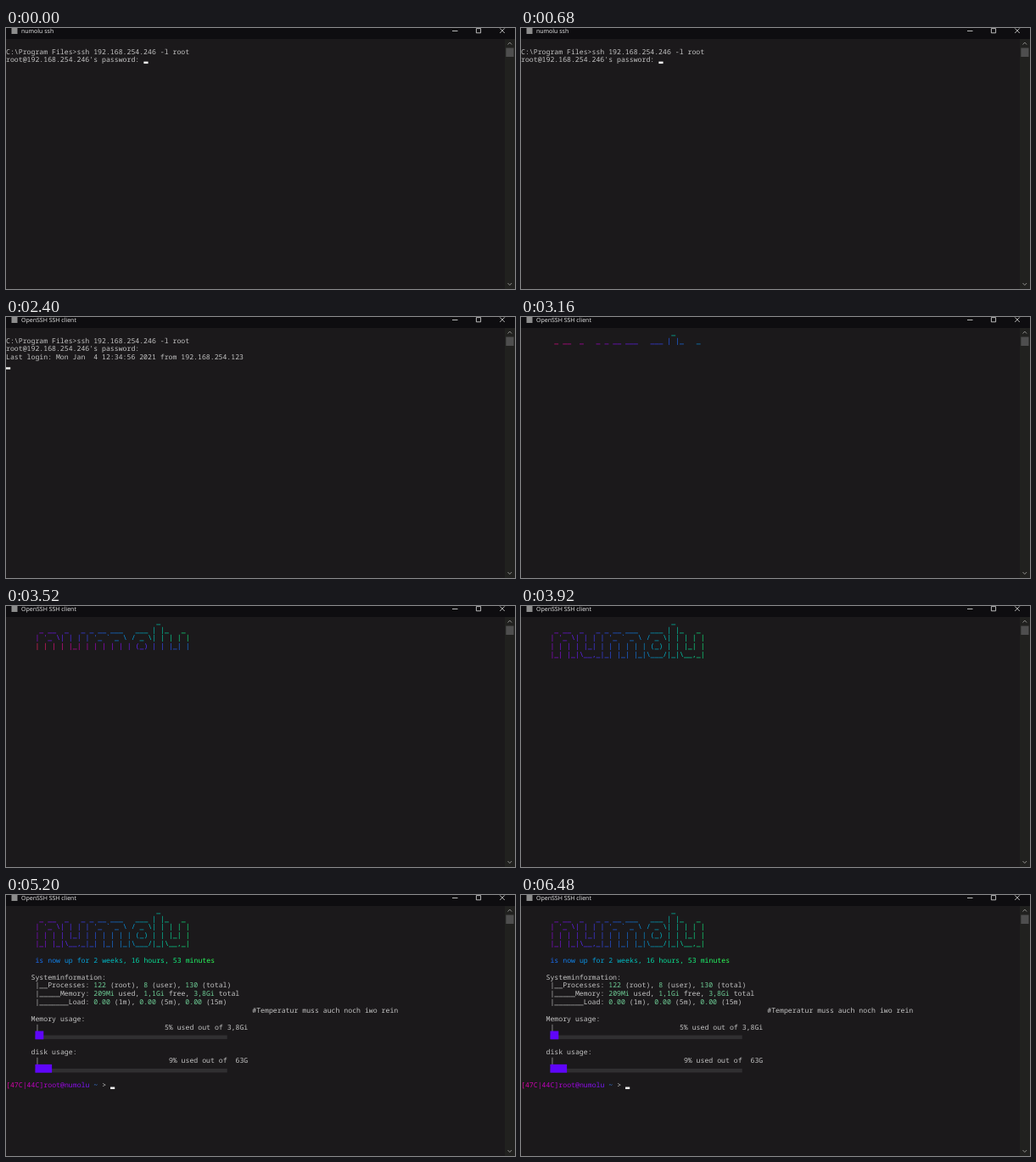
An HTML page for the animation above (6.52 s loop, 600x308 px).

```html
<!DOCTYPE html>
<html lang="en">
<head>
<meta charset="utf-8">
<title>Terminal login</title>
<style>
  html, body { margin: 0; width: 100%; height: 100%; overflow: hidden; background: #1b191b; }
  svg { display: block; width: 100vw; height: 100vh; }
  text { white-space: pre; text-rendering: geometricPrecision; }
  .mono { font: 8.2px "Noto Sans Mono", "DejaVu Sans Mono", monospace; fill: #c4c4c4; }
  .title { font: 7px "Open Sans", "Noto Sans", sans-serif; fill: #ededed; }
  .line { fill: none; stroke: #e4e4e4; stroke-width: .8; }
  .arrow { fill: none; stroke: #8b8b88; stroke-width: 1; }
</style>
</head>
<body>
<svg id="stage" viewBox="0 0 600 308">
  <rect width="600" height="308" fill="#1b191b"/>
  <rect x="588" y="13" width="12" height="295" fill="#21211f"/>
  <rect width="600" height="13" fill="#0e0d10"/>
  <rect x="6.5" y="0" width="7" height="7" fill="#8c8c8c"/>
  <text id="title" class="title" x="18" y="6"></text>
  <path class="line" d="M526 3.5h6.5M554.4 .6h5.2v5.2h-5.2zM582.2 .4l5.6 5.6m0-5.6l-5.6 5.6"/>
  <path class="arrow" d="M591.5 19.5l2.3-2.5 2.3 2.5M591.5 301l2.3 2.5 2.3-2.5"/>
  <rect x="589.3" y="23.5" width="9.2" height="10.5" fill="#4e4e4e"/>
  <g id="screen"></g>
  <rect id="cursor" width="5.2" height="2.5" fill="#f2f2f2"/>
</svg>
<script>
const LOOP = 6520, CELL_W = 4.92, CELL_H = 9.84, TOP = 12.9;
const HOST = "numolu";
const GREEN = "#6fcf97";
const NS = "http://www.w3.org/2000/svg";
const screen = document.getElementById("screen");
const title = document.getElementById("title");
const cursor = document.getElementById("cursor");
const timed = [];
const rainbows = [];

const rowTop = row => TOP + row * CELL_H;

function add(parent, tag, attrs, content = "") {
  const node = document.createElementNS(NS, tag);
  for (const key in attrs) node.setAttribute(key, attrs[key]);
  node.textContent = content;
  return parent.appendChild(node);
}

function group(from, to = LOOP) {
  const node = add(screen, "g", {});
  timed.push({ node, from, to });
  return node;
}

function textAt(parent, row, col) {
  return add(parent, "text", { class: "mono", x: col * CELL_W, y: rowTop(row) + 7.9 });
}

// Parts between asterisks are green.
function print(parent, row, col, str) {
  const line = textAt(parent, row, col);
  str.split("*").forEach((part, i) => add(line, "tspan", i % 2 ? { fill: GREEN } : {}, part));
}

function hue(degrees) {
  const channel = shift => Math.round(128 + 127 * Math.sin((degrees + shift) * Math.PI / 180));
  return `rgb(${channel(0)},${channel(120)},${channel(240)})`;
}

function rainbow(parent, row, col, str, base, slope) {
  const line = textAt(parent, row, col);
  const chars = [...str].map((ch, i) => ({ node: add(line, "tspan", {}, ch), angle: base + i * slope }));
  const paint = shift => chars.forEach(c => c.node.setAttribute("fill", hue(c.angle + shift)));
  paint(0);
  return paint;
}

function animatedLine(row, str, start, length, base, slope) {
  const paint = rainbow(group(start), row, 7, str, base, slope);
  rainbows.push({ paint, start, length });
}

function usage(parent, row, label, value, col, filled) {
  const y = rowTop(row + 2), x = 7 * CELL_W;
  print(parent, row, 6, label);
  print(parent, row + 1, 7, "|");
  print(parent, row + 1, col, value);
  add(parent, "rect", { x, y: y + 5, width: 46 * CELL_W, height: 4.6, fill: "#302f31" });
  add(parent, "rect", { x, y, width: filled * CELL_W, height: CELL_H, fill: "#5f05fa" });
}

// Login
const login = group(0, 2640);
print(login, 1, 0, "C:\\Program Files>ssh 192.168.254.246 -l root");
print(login, 2, 0, "root@192.168.254.246's password:");
print(group(2400, 2640), 3, 0, "Last login: Mon Jan  4 12:34:56 2021 from 192.168.254.123");

// Banner, one row after another
[
  "                             _",
  " _ __  _   _ _ __ ___   ___ | |_   _ ",
  "| '_ \\| | | | '_ ` _ \\ / _ \\| | | | |",
  "| | | | |_| | | | | | | (_) | | |_| |",
  "|_| |_|\\__,_|_| |_| |_|\\___/|_|\\__,_|"
].forEach((str, row) => animatedLine(row, str, 2840 + 212 * row, 212, 172, 3.6));
animatedLine(6, "is now up for 2 weeks, 16 hours, 53 minutes", 4360, 240, 232, 2.1);

// System report
const info = group(4720);
print(info, 8, 6, "Systeminformation:");
print(info, 9, 7, "|__Processes: *122* (root), *8* (user), *130* (total)");
print(info, 10, 7, "|_____Memory: *209Mi* used, *1,1Gi* free, *3,8Gi* total");
print(info, 11, 7, "|_______Load: *0.00* (1m), *0.00* (5m), *0.00* (15m)");
print(info, 12, 59, "#Temperatur muss auch noch iwo rein");
usage(group(4800), 13, "Memory usage:", "5% used out of 3,8Gi", 38, 2);
usage(group(4880), 17, "disk usage:", "9% used out of  63G", 39, 4);

const prompt = group(4960);
rainbow(prompt, 21, 0, `[47C|44C]root@${HOST}`, 135, 2.6);
add(textAt(prompt, 21, 21), "tspan", { fill: "#3a78d8" }, "~");
print(prompt, 21, 23, ">");

// Cursor: from, to, row, column
const cursorSpans = [
  [0, 40, 2, 33], [680, 1200, 2, 33], [1800, 2240, 2, 33],
  [2240, 2400, 3, 0], [2400, 2640, 4, 0], [2640, 2840, 0, 0],
  [4120, 4360, 6, 0], [4960, 5600, 21, 25], [6160, LOOP, 21, 25]
];

const show = (node, on) => node.setAttribute("visibility", on ? "visible" : "hidden");

function draw(t) {
  title.textContent = t >= 2320 ? "OpenSSH SSH client" : `${HOST} ssh`;
  timed.forEach(g => show(g.node, t >= g.from && t < g.to));
  rainbows.forEach(r => {
    const age = Math.floor((t - r.start) / 40) * 40;
    const progress = Math.min(1, Math.max(0, age / r.length));
    r.paint(-80 * (1 - progress));
  });
  const span = cursorSpans.find(([from, to]) => t >= from && t < to);
  show(cursor, span);
  if (span) {
    cursor.setAttribute("x", span[3] * CELL_W);
    cursor.setAttribute("y", rowTop(span[2]) + 7);
  }
}

const begin = performance.now();
function tick() {
  draw((performance.now() - begin) % LOOP);
  requestAnimationFrame(tick);
}
draw(0);
requestAnimationFrame(tick);
</script>
</body>
</html>
```
